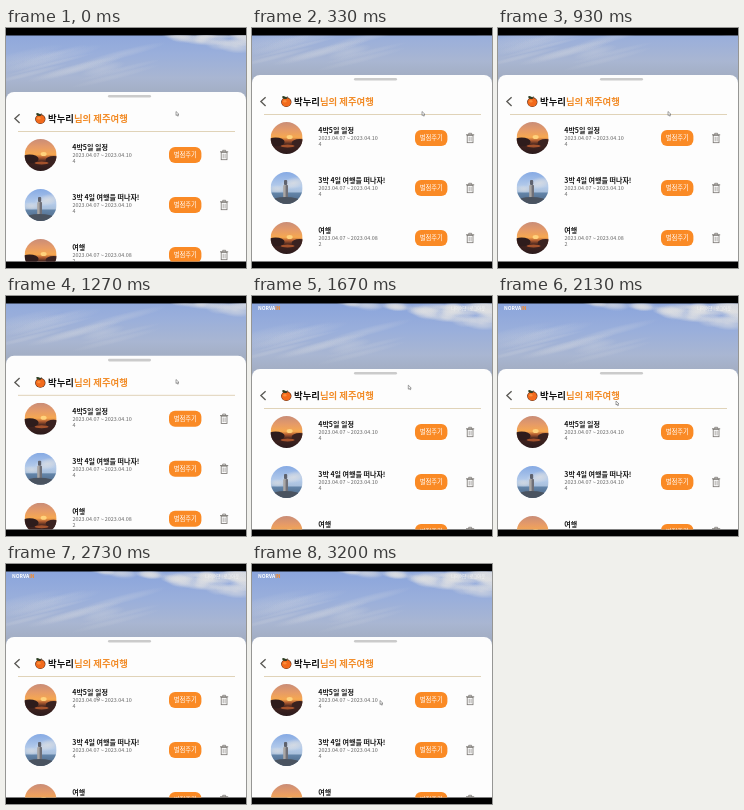
Write an HTML page with a canvas that moves like this. It is 240 by 240 pixels and loops after 3270 ms.

```html
<!DOCTYPE html>
<html lang="ko">
<head>
<meta charset="utf-8">
<title>여행 목록</title>
<style>
html, body { margin: 0; width: 100%; height: 100%; overflow: hidden; background: #000; }
canvas { display: block; width: 100vw; height: 100vh; }
</style>
</head>
<body>
<canvas id="stage"></canvas>
<script>
const SIZE = 240, LOOP = 3270, FRAMES = 49;
const FONT = '"Noto Sans CJK KR", "Noto Sans CJK", sans-serif';
const ORANGE = '#fa8a25';
const canvas = document.getElementById('stage');
const ctx = canvas.getContext('2d');

const trips = [
  { title: '4박5일 일정', dates: '2023.04.07 ~ 2023.04.10', count: '4', photo: sunset },
  { title: '3박 4일 여행을 떠나자!', dates: '2023.04.07 ~ 2023.04.10', count: '4', photo: lighthouse },
  { title: '여행', dates: '2023.04.07 ~ 2023.04.08', count: '2', photo: sunset }
];

// [time, x, y]
const pointer = [
  [0, 170, 83.5], [1500, 170, 83.5], [2000, 118, 105], [2200, 118, 105],
  [2650, 91, 132], [2800, 91, 132], [3150, 128, 136.5], [LOOP, 128, 136.5]
];

const clamp = v => Math.max(0, Math.min(1, v));
const smooth = v => v * v * (3 - 2 * v);
const mix = (a, b, k) => a + (b - a) * k;

function scrollAt(t) {
  const up = 1 - Math.pow(1 - clamp(t / 300), 2);
  const down = smooth(clamp((t - 1070) / 400));
  return mix(9, 26, up) * (1 - down);
}

function pointerAt(t) {
  let i = 1;
  while (i < pointer.length - 1 && pointer[i][0] < t) i++;
  const a = pointer[i - 1], b = pointer[i];
  const k = smooth(clamp((t - a[0]) / (b[0] - a[0])));
  return [mix(a[1], b[1], k), mix(a[2], b[2], k)];
}

function text(str, x, y, size, color, weight = 400, align = 'left') {
  ctx.font = `${weight} ${size}px ${FONT}`;
  ctx.fillStyle = color;
  ctx.textAlign = align;
  ctx.fillText(str, x, y);
  return ctx.measureText(str).width;
}

function box(x, y, w, h, r, color) {
  ctx.fillStyle = color;
  ctx.beginPath();
  ctx.roundRect(x, y, w, h, r);
  ctx.fill();
}

function disc(x, y, rx, ry, color, turn = 0) {
  ctx.fillStyle = color;
  ctx.beginPath();
  ctx.ellipse(x, y, rx, ry, turn, 0, Math.PI * 2);
  ctx.fill();
}

function stroke(points, color, width) {
  ctx.strokeStyle = color;
  ctx.lineWidth = width;
  ctx.beginPath();
  points.forEach(([x, y]) => ctx.lineTo(x, y));
  ctx.stroke();
}

function fade(y0, y1, ...stops) {
  const g = ctx.createLinearGradient(0, y0, 0, y1);
  stops.forEach(([at, color]) => g.addColorStop(at, color));
  return g;
}

function cloud(x, y, rx, ry, alpha, turn = 0) {
  ctx.save();
  ctx.translate(x, y);
  ctx.rotate(turn);
  ctx.scale(rx, ry);
  const g = ctx.createRadialGradient(0, 0, 0, 0, 0, 1);
  g.addColorStop(0, `rgba(226,226,226,${alpha})`);
  g.addColorStop(0.5, `rgba(226,226,226,${alpha * 0.65})`);
  g.addColorStop(1, 'rgba(226,226,226,0)');
  disc(0, 0, 1, 1, g);
  ctx.restore();
}

function sky() {
  ctx.fillStyle = fade(8, 76, [0, '#8ba5dc'], [0.4, '#9aafdb'], [0.75, '#a9b6d2'], [1, '#a2adc2']);
  ctx.fillRect(0, 0, SIZE, 90);
  let seed = 11;
  const rnd = () => (seed = seed * 16807 % 2147483647) / 2147483647;
  // bright bank widening towards the right edge
  for (let i = 0; i < 36; i++) {
    const k = Math.sqrt(rnd());
    cloud(95 + k * 150, 7 + rnd() * k * 24, 9 + rnd() * 14, 3 + rnd() * 4, 0.4 + rnd() * 0.3, 0.1);
  }
  for (let i = 0; i < 12; i++) {
    cloud(rnd() * 130, 22 + rnd() * 36, 20 + rnd() * 30, 2 + rnd() * 5, 0.12 + rnd() * 0.16, -0.25);
  }
}

function header() {
  const w = text('NORVA', 6, 14, 5, '#fff', 700);
  text('IN', 6 + w, 14, 5, ORANGE, 700);
  text('나의여행 | 로그아웃', 233, 13.7, 4.2, '#f4f4f4', 500, 'right');
}

function sunset(x, y) {
  ctx.fillStyle = fade(y - 16, y + 16, [0, '#c98d78'], [0.25, '#e59a68'], [0.48, '#f6a850'], [0.58, '#b05c30'], [0.7, '#44241f'], [1, '#2a1a1c']);
  ctx.fillRect(x - 16, y - 16, 32, 32);
  disc(x + 3, y - 1, 3, 2, '#ffd27c');
  disc(x - 11, y + 4, 9, 4.5, '#2e1c1c');
  disc(x + 13, y + 5, 8, 4, '#3a2220');
  disc(x + 1, y + 8, 7, 1.5, '#a4522c');
}

function lighthouse(x, y) {
  ctx.fillStyle = fade(y - 16, y + 16, [0, '#86aae4'], [0.45, '#b4cbea'], [0.62, '#a9c0dc'], [0.66, '#6384a8'], [1, '#4c6684']);
  ctx.fillRect(x - 16, y - 16, 32, 32);
  cloud(x + 7, y - 5, 14, 6, 0.75, -0.2);
  cloud(x - 9, y + 1, 9, 4, 0.6);
  box(x - 3.4, y - 3, 4.8, 13, 1, '#a9a6a4');
  box(x - 1, y - 3, 2.4, 13, 1, '#6f7078');
  box(x - 2.6, y - 8, 3.2, 5, 1, '#5e626e');
  disc(x - 1, y + 13, 15, 4, '#4a5360');
}

function trash(y) {
  const c = '#77736f';
  ctx.strokeStyle = c;
  ctx.lineWidth = 0.8;
  ctx.strokeRect(215.2, y - 2.7, 5.8, 7.4);
  stroke([[214, y - 3.2], [222.2, y - 3.2]], c, 0.9);
  stroke([[216.7, y - 3.4], [216.7, y - 4.7], [219.6, y - 4.7], [219.6, y - 3.4]], c, 0.8);
  for (const x of [217.2, 219.1]) stroke([[x, y - 1.2], [x, y + 3.3]], c, 0.6);
}

function row(trip, y) {
  ctx.save();
  ctx.beginPath();
  ctx.arc(34.6, y, 16, 0, Math.PI * 2);
  ctx.clip();
  trip.photo(34.6, y);
  ctx.restore();
  text(trip.title, 66.3, y - 5.3, 7, '#161616', 700);
  text(trip.dates, 66.5, y + 2.2, 5.4, '#686868');
  text(trip.count, 66.5, y + 8, 5.4, '#686868');
  box(163, y - 8, 32.4, 16, 6, ORANGE);
  text('별점주기', 179.3, y + 2.4, 6.3, '#fff', 500, 'center');
  trash(y);
}

function tangerine(x, y) {
  disc(x, y + 0.6, 5.2, 4.8, '#5a2a14');
  disc(x, y + 0.7, 4.6, 4.2, '#f26a1c');
  disc(x - 1.4, y - 0.2, 1.6, 1.2, '#fb8f3c');
  disc(x - 1.8, y - 3.9, 2.5, 1.2, '#2d3f24', 0.35);
  stroke([[x + 0.4, y - 3], [x + 1, y - 5]], '#38301d', 0.9);
}

function sheet() {
  box(0, 73, SIZE, 240, [8, 8, 0, 0], '#fdfdfd');
  box(102, 76, 43, 2.6, 1.3, '#cbcbcb');
  stroke([[13.6, 95.2], [8.9, 99.6], [13.6, 104]], '#5d5c58', 1.4);
  tangerine(34.3, 99.5);
  const w = text('박누리', 42, 103.1, 9.4, '#141414', 900);
  text('님의 제주여행', 42 + w, 103.1, 9.4, '#f28c28', 900);
  stroke([[12, 112.5], [229, 112.5]], '#e0d3b8', 1);
  trips.forEach((trip, i) => row(trip, 136 + i * 50));
}

function arrow(x, y) {
  ctx.beginPath();
  [[0, 0], [0, 4], [1, 3.2], [1.7, 4.7], [2.4, 4.4], [1.8, 3], [3, 2.9]]
    .forEach(([dx, dy]) => ctx.lineTo(x + dx, y + dy));
  ctx.closePath();
  ctx.fillStyle = '#fff';
  ctx.strokeStyle = '#666';
  ctx.lineWidth = 0.6;
  ctx.fill();
  ctx.stroke();
}

function draw(t) {
  const ratio = window.devicePixelRatio || 1;
  const w = Math.round(innerWidth * ratio), h = Math.round(innerHeight * ratio);
  if (canvas.width !== w || canvas.height !== h) {
    canvas.width = w;
    canvas.height = h;
  }
  ctx.setTransform(w / SIZE, 0, 0, h / SIZE, 0, 0);
  ctx.fillStyle = '#000';
  ctx.fillRect(0, 0, SIZE, SIZE);
  ctx.save();
  ctx.beginPath();
  ctx.rect(0, 7.5, SIZE, 226);
  ctx.clip();
  ctx.translate(0, -scrollAt(t));
  sky();
  header();
  sheet();
  ctx.restore();
  arrow(...pointerAt(t));
}

const start = performance.now();
function tick() {
  const t = (performance.now() - start) % LOOP;
  const step = LOOP / FRAMES;
  draw(Math.floor(t / step + 0.05) * step);
  requestAnimationFrame(tick);
}
tick();
</script>
</body>
</html>
```
